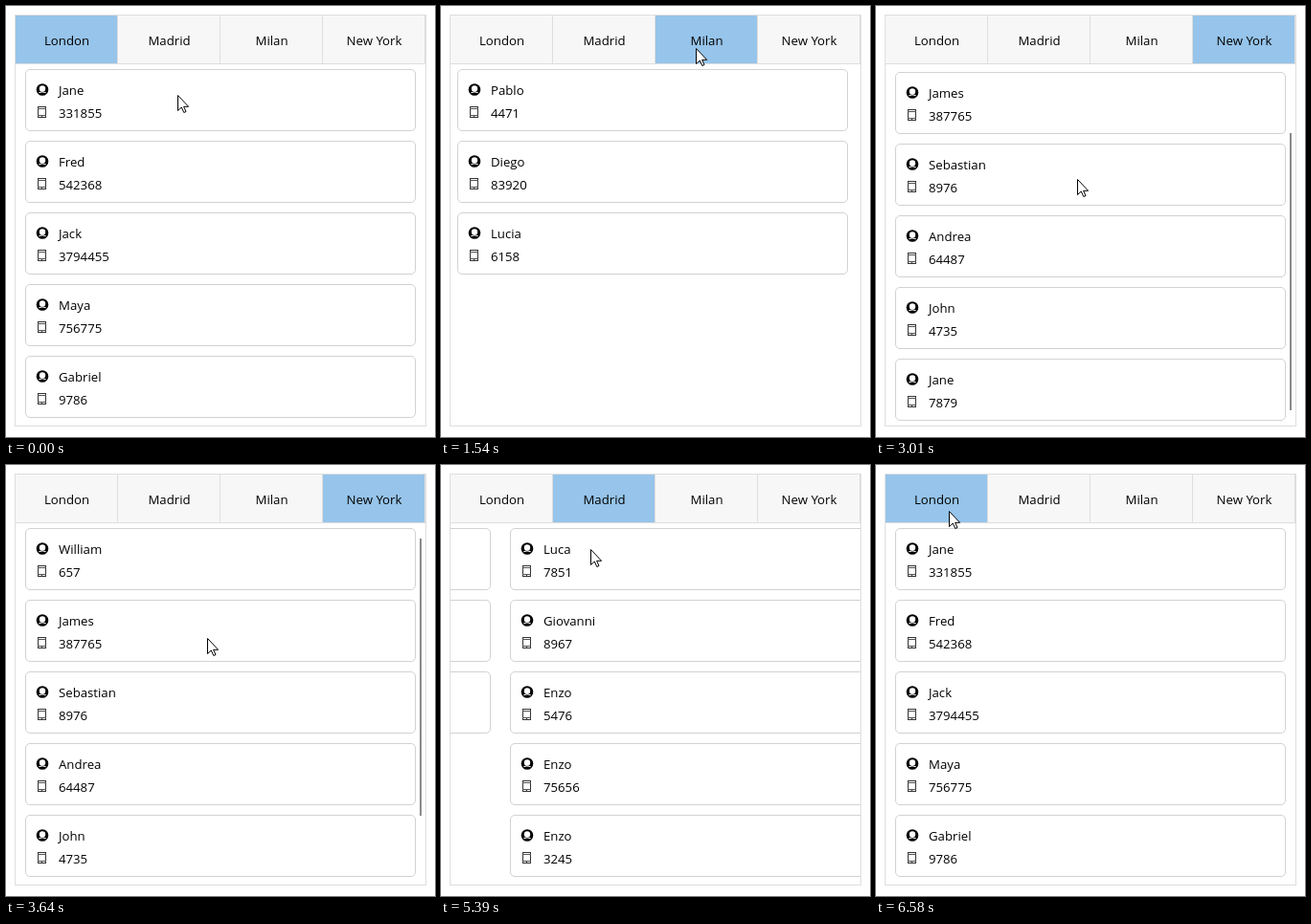
Write an HTML page with a canvas that moves like this. It is 448 px wide and 451 px high and loops after 7.14 s.

```html
<!DOCTYPE html>
<html lang="en">
<head>
<meta charset="utf-8">
<title>Contacts by city</title>
<style>
  html, body { margin: 0; width: 100%; height: 100%; overflow: hidden; background: #fff; }
  canvas { display: block; }
</style>
</head>
<body>
<canvas id="stage" width="448" height="451"></canvas>
<script>
const LOOP = 7140, TICK = 70;
const PAGE = 428, ROW = 75, TAB = 107, MAX_SCROLL = 72;
const SLIDE_MS = 250;

const cities = [
  ['London', 'Jane 331855,Fred 542368,Jack 3794455,Maya 756775,Gabriel 9786'],
  ['Madrid', 'Pablo 4471,Diego 83920,Lucia 6158'],
  ['Milan', 'Luca 7851,Giovanni 8967,Enzo 5476,Enzo 75656,Enzo 3245'],
  ['New York', 'William 657,James 387765,Sebastian 8976,Andrea 64487,John 4735,Jane 7879'],
].map(([name, list]) => ({ name, people: list.split(',').map(p => p.split(' ')) }));

// [start time, city index]
const slides = [[863, 1], [1510, 2], [2060, 3], [4100, 2], [5312, 1], [6340, 0]];

// [time, x, y]
const pointer = [
  [0, 179, 93], [140, 179, 93], [630, 159, 44], [1120, 159, 44], [1330, 266, 44],
  [1750, 266, 44], [1960, 381, 37], [2450, 381, 37], [2660, 210, 181], [3640, 210, 181],
  [3990, 247, 42], [4270, 247, 42], [4410, 176, 107], [4620, 173, 165], [4900, 173, 165],
  [5180, 143, 46], [5320, 143, 46], [5390, 156, 88], [5530, 162, 173], [5810, 162, 173],
  [6230, 76, 48], [LOOP, 76, 48],
];

const ctx = document.getElementById('stage').getContext('2d');
const arrow = new Path2D('M.5 .5V16.5L4.3 13L6.8 18.5L9 17.5L6.6 12.3H11.6Z');

const ramp = (t, a, b) => Math.min(1, Math.max(0, (t - a) / (b - a)));
const smooth = p => p * p * (3 - 2 * p);
const cubicInOut = p => p < .5 ? 4 * p ** 3 : 1 - 4 * (1 - p) ** 3;

function rect(x, y, w, h, color) {
  ctx.fillStyle = color;
  ctx.fillRect(x, y, w, h);
}

function text(str, x, y, align = 'left') {
  ctx.fillStyle = '#000';
  ctx.textAlign = align;
  ctx.fillText(str, x, y);
}

function disc(x, y, r, color) {
  ctx.fillStyle = color;
  ctx.beginPath();
  ctx.arc(x, y, r, 0, Math.PI * 2);
  ctx.fill();
}

function personIcon(x, y) {
  disc(x, y, 6.3, '#000');
  disc(x, y - 1, 3.2, '#fff');
  ctx.strokeStyle = '#fff';
  ctx.beginPath();
  ctx.moveTo(x - 3.7, y + 3.2);
  ctx.quadraticCurveTo(x, y + 1.6, x + 3.7, y + 3.2);
  ctx.stroke();
}

function phoneIcon(x, y) {
  ctx.strokeStyle = '#333';
  ctx.strokeRect(x + .5, y + .5, 8, 11);
  rect(x, y + 2, 9, 1, '#555');
  rect(x, y + 9, 9, 1, '#555');
  rect(x + 4, y + 10, 1, 1, '#333');
}

function card([name, number], x, y) {
  ctx.strokeStyle = '#d2d2d2';
  ctx.beginPath();
  ctx.roundRect(x + .5, y + .5, 407, 64, 4.5);
  ctx.stroke();
  personIcon(x + 18, y + 21.5);
  phoneIcon(x + 13, y + 39);
  text(name, x + 35, y + 27);
  text(number, x + 35, y + 51);
}

function tabs(active) {
  rect(10, 10, PAGE, 50, '#f7f7f7');
  cities.forEach(({ name }, i) => {
    const x = 10 + i * TAB;
    if (i === active) rect(x, 10, TAB - 1, 50, '#96c4ea');
    rect(x + TAB - 1, 10, 1, 50, '#dedede');
    text(name, x + TAB / 2, 41, 'center');
  });
  rect(10, 60, PAGE, 1, '#dedede');
}

function pages(position, scroll, showBar) {
  ctx.save();
  ctx.beginPath();
  ctx.rect(10, 61, PAGE, 378);
  ctx.clip();
  cities.forEach(({ people }, i) => {
    const x = 20 + Math.round((i - position) * PAGE);
    const shift = i === 3 ? scroll : 0;
    people.forEach((p, row) => card(p, x, 66 + row * ROW - shift));
  });
  if (showBar) rect(432, 77 + scroll * 56 / MAX_SCROLL, 2, 290, '#8a8a8a');
  ctx.restore();
}

function cursor(t) {
  const i = Math.max(1, pointer.findIndex(k => k[0] >= t));
  const [t0, x0, y0] = pointer[i - 1], [t1, x1, y1] = pointer[i];
  const p = smooth(ramp(t, t0, t1));
  ctx.save();
  ctx.translate(Math.round(x0 + (x1 - x0) * p), Math.round(y0 + (y1 - y0) * p));
  ctx.fillStyle = '#fff';
  ctx.fill(arrow);
  ctx.strokeStyle = '#000';
  ctx.stroke(arrow);
  ctx.restore();
}

function draw(t) {
  let active = 0, position = 0;
  for (const [start, city] of slides) {
    if (t < start) break;
    position = active + (city - active) * cubicInOut(ramp(t, start, start + SLIDE_MS));
    active = city;
  }
  const scroll = Math.round(MAX_SCROLL * (smooth(ramp(t, 2660, 3010)) - smooth(ramp(t, 3360, 3640))));

  rect(0, 0, 448, 451, '#fff');
  ctx.font = '13.2px "Open Sans", sans-serif';
  ctx.lineWidth = 1;
  pages(position, scroll, t >= 2590 && t < 3990);
  tabs(active);
  ctx.strokeStyle = '#dedede';
  ctx.strokeRect(9.5, 9.5, 429, 430);
  cursor(t);
}

function loop() {
  const t = performance.now() % LOOP;
  draw(Math.floor(t / TICK) * TICK);
  requestAnimationFrame(loop);
}
loop();
</script>
</body>
</html>
```
